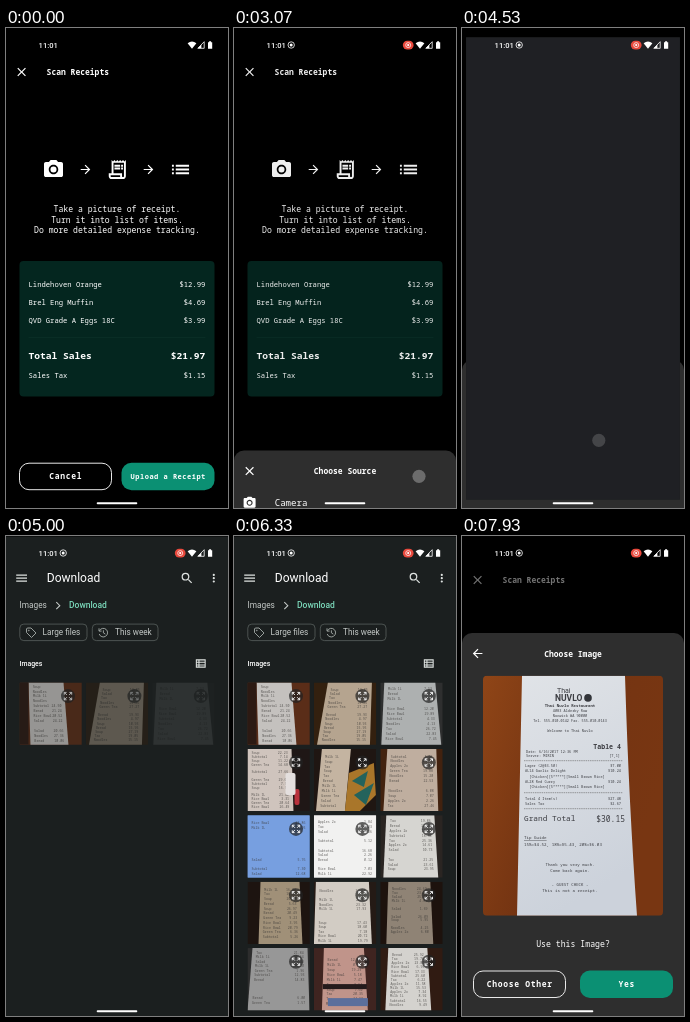
These frames come from a looping animation (222 by 480 pixels, 8000 ms). An HTML page:

```html
<!DOCTYPE html>
<html lang="en">
<head>
<meta charset="utf-8">
<title>Scan Receipts</title>
<style>
html, body { margin: 0; width: 100%; height: 100%; overflow: hidden; background: #000; }
svg { display: block; }
#stage { width: 100vw; height: 100vh; }
text { font-family: "Roboto Mono", "Noto Sans Mono", monospace; white-space: pre; }
.ui { font-family: Roboto, sans-serif; }
</style>
</head>
<body>
<svg id="stage" viewBox="0 0 222 480" preserveAspectRatio="none"></svg>
<script>
const ICON = {
  close: 'M19 6.41 17.59 5 12 10.59 6.41 5 5 6.41 10.59 12 5 17.59 6.41 19 12 13.41 17.59 19 19 17.59 13.41 12z',
  camera: 'M12 8.8a3.2 3.2 0 1 0 0 6.4a3.2 3.2 0 1 0 0-6.4zM9 2 7.17 4H4c-1.1 0-2 .9-2 2v12c0 1.1.9 2 2 2h16c1.1 0 2-.9 2-2V6c0-1.1-.9-2-2-2h-3.17L15 2zm3 15c-2.76 0-5-2.24-5-5s2.24-5 5-5 5 2.24 5 5-2.24 5-5 5z',
  arrow: 'M12 4l-1.41 1.41L16.17 11H4v2h12.17l-5.58 5.59L12 20l8-8z',
  back: 'M20 11H7.83l5.59-5.59L12 4l-8 8 8 8 1.41-1.41L7.83 13H20z',
  receipt: 'M19.5 3.5 18 2l-1.5 1.5L15 2l-1.5 1.5L12 2l-1.5 1.5L9 2 7.5 3.5 6 2v14H3v3c0 1.66 1.34 3 3 3h12c1.66 0 3-1.34 3-3V2zM15 20H6c-.55 0-1-.45-1-1v-1h10zm4-1c0 .55-.45 1-1 1s-1-.45-1-1v-3H8V5h11zM9 7h6v2H9zM16 7h2v2h-2zM9 10h6v2H9zM16 10h2v2h-2z',
  list: 'M3 11h2v2H3zM3 15h2v2H3zM3 7h2v2H3zM7 11h14v2H7zM7 15h14v2H7zM7 7h14v2H7z',
  rows: 'M3 4v16h19V4zM8 6v2.7H5V6zM5 14v-3.3h3V14zM5 16h3v2H5zM20 18H10v-2h10zM20 14H10v-3.3h10zM20 8.7H10V6h10z',
  picture: 'M21 19V5c0-1.1-.9-2-2-2H5c-1.1 0-2 .9-2 2v14c0 1.1.9 2 2 2h14c1.1 0 2-.9 2-2zM8.5 13.5l2.5 3.01L14.5 12l4.5 6H5z',
  menu: 'M3 18h18v-2H3zM3 13h18v-2H3zM3 6v2h18V6z',
  search: 'M15.5 14h-.79l-.28-.27A6.47 6.47 0 0 0 16 9.5 6.5 6.5 0 1 0 9.5 16c1.61 0 3.09-.59 4.23-1.57l.27.28v.79l5 4.99L20.49 19zm-6 0C7.01 14 5 11.99 5 9.5S7.01 5 9.5 5 14 7.01 14 9.5 11.99 14 9.5 14z',
  more: 'M12 4a2 2 0 1 0 0 4a2 2 0 1 0 0-4zM12 10a2 2 0 1 0 0 4a2 2 0 1 0 0-4zM12 16a2 2 0 1 0 0 4a2 2 0 1 0 0-4z'
};

const icon = (name, x, y, s, fill = '#fff') =>
  `<path d="${ICON[name]}" fill="${fill}" fill-rule="evenodd" transform="translate(${x} ${y}) scale(${s}) translate(-12 -12)"/>`;
// y is the middle of the capitals
const text = (x, y, str, size, attrs = '') =>
  `<text x="${x}" y="${y + size * .36}" font-size="${size}" fill="#fff" ${attrs}>${str}</text>`;
const MID = 'text-anchor="middle" ', END = 'text-anchor="end" ', BOLD = 'font-weight="600" ';
const box = (x, y, w, h, r, fill, attrs = '') =>
  `<rect x="${x}" y="${y}" width="${w}" height="${h}" rx="${r}" fill="${fill}" ${attrs}/>`;
const outlined = (x, y, label) =>
  box(x + .5, y + .5, 92, 26.5, 9.5, 'none', 'stroke="#e8e8e8"') +
  text(x + 46.8, y + 13.7, label, 8, MID + BOLD + 'letter-spacing=".7"');
const filled = (x, y, label, size, gap) =>
  box(x, y, 93, 27.5, 10, '#0b9073') +
  text(x + 46.7, y + 13.7, label, size, MID + BOLD + `letter-spacing="${gap}"`);

function home() {
  const line = (y, name, price, size = 7.2, attrs = '') =>
    text(22.5, y, name, size, attrs) + text(199.3, y, price, size, END + attrs);
  return icon('close', 15.6, 44, .61) + text(40.6, 44.2, 'Scan Receipts', 8, BOLD) +
    icon('camera', 47.5, 141.5, .95) + icon('arrow', 79.5, 141.5, .6) +
    icon('receipt', 111.3, 141.5, .95) + icon('arrow', 142.5, 141.5, .6) + icon('list', 174.5, 141.5, .95) +
    ['Take a picture of receipt.', 'Turn it into list of items.', 'Do more detailed expense tracking.']
      .map((s, i) => text(111, 181.5 + i * 10.1, s, 8.14, MID)).join('') +
    box(13.5, 233, 195, 135.5, 4, '#04261f') +
    line(256, 'Lindehoven Orange', '$12.99') + line(274, 'Brel Eng Muffin', '$4.69') +
    line(292, 'QVD Grade A Eggs 18C', '$3.99') +
    box(22.5, 309.3, 177, .6, 0, '#0d332b') +
    line(327.5, 'Total Sales', '$21.97', 9.6, BOLD) + line(347, 'Sales Tax', '$1.15') +
    outlined(13, 434.7, 'Cancel') + filled(115.5, 434.7, 'Upload a Receipt', 7, .5);
}

// Photo of the receipt, in a 180 x 240 box
function photo() {
  const ink = 'style="fill:#3c3d42" ';
  const L = (x, y, s, size = 3.6, a = '') => text(x, y, s, size, ink + a);
  const C = (y, s, size = 3.6, a = '') => L(87, y, s, size, MID + a);
  const item = (y, s, price) => L(42, y, s) + L(138, y, price, 3.6, END);
  const rule = y => `<path d="M41 ${y}H140" stroke="#666" stroke-width=".6" stroke-dasharray="1.5 .7"/>`;
  const extra = '[Chicken][5*****][Small Brown Rice]';
  return box(0, 0, 180, 240, 0, 'url(#wood)') +
    '<path d="M39 0H142Q146 130 154 240H34Z" fill="url(#paper)"/>' +
    L(74, 15, 'Thai', 7, 'class="ui" ') +
    L(72, 22.2, 'NUVLO', 8.5, 'class="ui" ' + BOLD) + '<circle cx="105" cy="22.2" r="3.8" fill="#33353a"/>' +
    C(29.8, 'Thai Nuvlo Restaurant', 4, BOLD) + C(35, '4083 Alderby Row') + C(40, 'Norwick WA 90000') +
    C(45, 'Tel. 555-010-0142 Fax. 555-010-0143', 3.5) + C(55.5, 'Welcome to Thai Nuvlo') +
    L(138, 70.5, 'Table 4', 6.6, END + BOLD) + L(43, 76, 'Date: 6/16/2017 12:36 PM') +
    L(43, 80.5, 'Server: MIRIN') + L(137, 80.5, '[7,1]', 3.6, END) + rule(85) +
    item(90, 'Lager (2@$3.50)', '$7.00') + item(95.3, '#L14 Garlic Delight', '$10.24') +
    item(100.6, '  ' + extra, '') + item(106, '#L28 Red Curry', '$10.24') + item(111.3, '  ' + extra, '') +
    rule(117) + item(123, 'Total 4 Item(s)', '$27.48') + item(128.2, 'Sales Tax', '$2.67') + rule(133) +
    L(41, 143, 'Grand Total', 7.8) + L(142, 143, '$30.15', 8, END) +
    L(41, 162, 'Tip Guide', 4.2, 'text-decoration="underline" ') +
    L(41, 169, '15%=$4.52, 18%=$5.43, 20%=$6.03', 4.2) +
    C(189, 'Thank you very much.', 4.1) + C(195, 'Come back again.', 4.1) +
    C(209, '- GUEST CHECK -', 4.1) + C(215, 'This is not a receipt.', 4.2);
}

let seed = 7;
const rnd = () => (seed = seed * 16807 % 2147483647) / 2147483647;
const WORDS = ['Rice Bowl', 'Green Tea', 'Soup', 'Bread', 'Apples 2x', 'Noodles', 'Subtotal', 'Milk 1L', 'Tax', 'Salad'];

// background, paper, paper edges (top left, top right, bottom right, bottom left), extra shapes
const SHOTS = [
  ['#5a2d18', '#c4c1be', 9, 44, 49, 11, box(0, 0, 9, 62, 0, '#2c1a13')],
  ['#33200f', '#b5a48f', 14, 58, 56, 3],
  ['#2e2f2f', '#adb0b0', 4, 55, 61, 1],
  ['#1f1716', '#cfc4bd', 0, 44, 46, 0, box(47, 40, 5, 16, 2, '#b8313c') + box(38, 24, 10, 22, 2, '#e4dfde')],
  ['#1f1612', '#c4b4a1', 8, 37, 31, 2, '<path d="M35 24 60 14 62 46 46 62H31Z" fill="#a9762a"/><path d="M38 32 54 22 50 38ZM40 46 60 34 52 56Z" fill="#24635c"/>'],
  ['#42220f', '#bfae9f', 7, 56, 58, 3],
  ['#6b94d6', '#779fe0', 0, 62, 62, 0],
  ['#dcdcdc', '#f1f1f0', 0, 62, 62, 0],
  ['#2a2522', '#d6d5d1', 6, 54, 58, 3],
  ['#1d1410', '#a09078', 13, 52, 55, 11],
  ['#241a15', '#d2ccc4', 2, 55, 58, 0],
  ['#1d120d', '#8f8375', 8, 50, 53, 6],
  ['#2d2d2d', '#979797', 5, 60, 62, 0],
  ['#3f2420', '#c0948a', 10, 50, 54, 8, box(9, 36, 44, 5, 0, '#241b1c') + box(14, 50, 40, 8, 0, '#5b6f9c')],
  ['#301b12', '#d4d2ce', 8, 47, 51, 5]
];

function thumb([bg, paper, tl, tr, br, bl, extra = ''], i) {
  let lines = '';
  const start = 4 + rnd() * 4, gap = 3.8 + rnd() * 1.2;
  for (let y = start; y < 60; y += gap) {
    if (rnd() < .15) continue;
    const k = y / 62, word = WORDS[rnd() * WORDS.length | 0];
    const left = tl + (bl - tl) * k + 4, right = tr + (br - tr) * k - 4;
    const tone = 'style="fill:#3a3836" opacity=".75" ';
    lines += text(left, y, word, 3.3, tone) +
      (right - left > 28 ? text(right, y, (rnd() * 30).toFixed(2), 3.3, tone + END) : '');
  }
  const corners = [0, 90, 180, 270].map(a =>
    `<path d="M-1.1-1.1 -3.6-3.6M-3.7-1.4V-3.7H-1.4" transform="rotate(${a})"/>`).join('');
  return `<svg class="thumb" x="${13.5 + i % 3 * 66.4}" y="${146 + (i / 3 | 0) * 66.4}" width="62.2" height="62.2">
    ${box(0, 0, 63, 63, 0, bg)}<path d="M${tl} 0H${tr}L${br} 63H${bl}Z" fill="${paper}"/>${lines}${extra}
    <g transform="translate(48.5 13.6)" fill="none" stroke="#fff" stroke-width=".9"><circle r="7" fill="#222" fill-opacity=".7" stroke="none"/>${corners}</g></svg>`;
}

function picker() {
  const ui = 'class="ui" ', grey = ui + 'style="fill:#c3c8c6" ';
  const chip = (x, w, label) => box(x, 87.6, w, 16.5, 4, 'none', 'stroke="#59605e" stroke-width=".8"') +
    text(x + 22.8, 95.7, label, 8.2, grey);
  return icon('menu', 15.6, 41.7, .6, '#dfe3e1') + text(40.8, 41.1, 'Download', 12, ui) +
    icon('search', 181, 41.7, .6, '#dfe3e1') + icon('more', 207.8, 41.7, .55, '#dfe3e1') +
    text(13.5, 68.9, 'Images', 8.3, grey) +
    '<path d="M50.3 65.7 53.8 69.2 50.3 72.7" fill="none" stroke="#c3c8c6" stroke-width="1.1"/>' +
    text(63, 68.9, 'Download', 8.5, ui + 'font-weight="500" style="fill:#7bd8ba" ') +
    chip(13.8, 67.2, 'Large files') + chip(86.3, 65.7, 'This week') +
    `<g fill="none" stroke="#a6adaa" stroke-width=".9"><path d="M20.5 92.5V96l5 5 4.5-4.5-5-5H21.3Z"/><circle cx="22.8" cy="94" r=".4"/>
     <path d="M93.4 94.3A4.3 4.3 0 1 1 93.2 97.5M93 91.8V94.6H95.6M97.4 93.8V96.4L99.3 97.6"/></g>` +
    text(13.5, 126.7, 'Images', 6.9, ui + 'font-weight="500" ') + icon('rows', 194.5, 127, .52, '#dfe3e1') +
    SHOTS.map(thumb).join('');
}

const status = `
  ${text(32.6, 17, '11:01', 7.6, 'class="ui" font-weight="500" ')}
  <g id="rec"><circle cx="57.2" cy="17" r="3.2" fill="none" stroke="#fff" stroke-width=".8"/><circle cx="57.2" cy="17" r="1.5" fill="#fff"/>
  ${box(168.8, 12.7, 10.8, 8.8, 4.4, '#e8483c')}
  <circle cx="174.2" cy="17.1" r="2.5" fill="none" stroke="#fff" stroke-width=".7"/><circle cx="174.2" cy="17.1" r="1.1" fill="#fff"/></g>
  <path d="M181.6 15.2Q186 11.8 190.4 15.2L186 20.8Z" fill="#fff"/>
  <path d="M191.8 20.3 198.2 13.7V20.3Z" fill="none" stroke="#fff" stroke-width=".8"/><path d="M191.8 20.3 195.4 16.6V20.3Z" fill="#fff"/>
  <path d="M202 14.2H203.1V13.2H205.1V14.2H206.2V20.8H202Z" fill="#fff"/>
  ${box(90.7, 474.3, 40.6, 1.9, .9, '#fff')}`;

document.getElementById('stage').innerHTML = `
  <defs>
    <linearGradient id="wood" x2="1" y2=".4"><stop stop-color="#8f4517"/><stop offset=".5" stop-color="#743412"/><stop offset="1" stop-color="#783612"/></linearGradient>
    <linearGradient id="paper" x2=".3" y2="1"><stop stop-color="#e0e3e7"/><stop offset="1" stop-color="#ccd2db"/></linearGradient>
    <clipPath id="frame">${box(0, 0, 180, 240, 4, '#fff')}</clipPath>
  </defs>
  ${box(0, 0, 222, 480, 0, '#000')}
  ${home()}
  <rect id="scrim" width="222" height="480"/>
  <g id="sheet">
    ${box(0, 0, 222, 500, 10, '#2e2e2e')}
    <g id="source">${icon('close', 15.6, 20.5, .61)}${text(111, 21, 'Choose Source', 8, MID + BOLD)}
      ${icon('camera', 15.6, 52.3, .6)}${text(40.7, 52.5, 'Camera', 9.1)}
      ${icon('picture', 15.6, 82.3, .6)}${text(40.7, 82.5, 'Gallery', 9.1)}</g>
    <g id="image">${icon('back', 15.6, 20.5, .6)}${text(111, 20.8, 'Choose Image', 8, MID + BOLD)}
      <g transform="translate(21 42.7)" clip-path="url(#frame)">${photo()}</g>
      <g id="ask">${text(111, 311.5, 'Use this Image?', 8.2, MID)}</g>
      <g id="answers">${outlined(11, 337.5, 'Choose Other')}${filled(118, 337.5, 'Yes', 8, .7)}</g></g>
  </g>
  <g id="picker">${box(0, 0, 222, 480, 0, '#1b1f1f')}${picker()}<rect id="splash" width="222" height="480" fill="#1f2024"/></g>
  <circle id="touch" r="6.6" fill="#aaa"/>
  ${status}`;

const el = {};
for (const id of ['rec', 'scrim', 'sheet', 'source', 'image', 'ask', 'answers', 'picker', 'splash', 'touch'])
  el[id] = document.getElementById(id);
const thumbs = [...document.querySelectorAll('.thumb')];

const ramp = (t, a, b) => Math.min(1, Math.max(0, (t - a) / (b - a)));
const easeOut = (k, n) => 1 - (1 - k) ** n;
const fade = (node, o) => {
  node.setAttribute('opacity', o);
  node.style.display = o > 0 ? '' : 'none';
};
const move = (node, y) => node.setAttribute('transform', `translate(0 ${y})`);

function render(t) {
  fade(el.rec, ramp(t, 60, 330));

  const rise = easeOut(ramp(t, 3000, 3470), 3), grow = easeOut(ramp(t, 6506, 6806), 3);
  move(el.sheet, 480 - 148 * rise - 235 * grow);
  fade(el.scrim, .45 * ramp(t, 3000, 3470) + .1 * grow);
  fade(el.source, t < 6506 ? 1 : 0);
  fade(el.image, grow);
  move(el.ask, -62 * (1 - grow));
  move(el.answers, -124 * (1 - grow));

  const open = easeOut(ramp(t, 4330, 4730), 2), shut = ramp(t, 6340, 6510);
  const s = .85 + .15 * open - .1 * shut * shut;
  el.picker.setAttribute('transform', `translate(111 240.5) scale(${s}) translate(-111 -240)`);
  fade(el.picker, ramp(t, 4330, 4530) * (1 - shut));
  fade(el.splash, 1 - ramp(t, 4800, 4930));
  thumbs.forEach((node, i) => fade(node, ramp(t, 4950 + i * 21, 5020 + i * 21)));

  const first = t < 3600;
  el.touch.setAttribute('cx', first ? 185 : 136.8);
  el.touch.setAttribute('cy', first ? 448.3 : 412.3);
  fade(el.touch, first
    ? .5 * ramp(t, 2640, 2700) * (1 - ramp(t, 3090, 3220))
    : .27 * ramp(t, 4100, 4140) * (1 - ramp(t, 4560, 4680)));
}

function tick() {
  render(performance.now() % 8000);
  requestAnimationFrame(tick);
}
tick();
</script>
</body>
</html>
```
